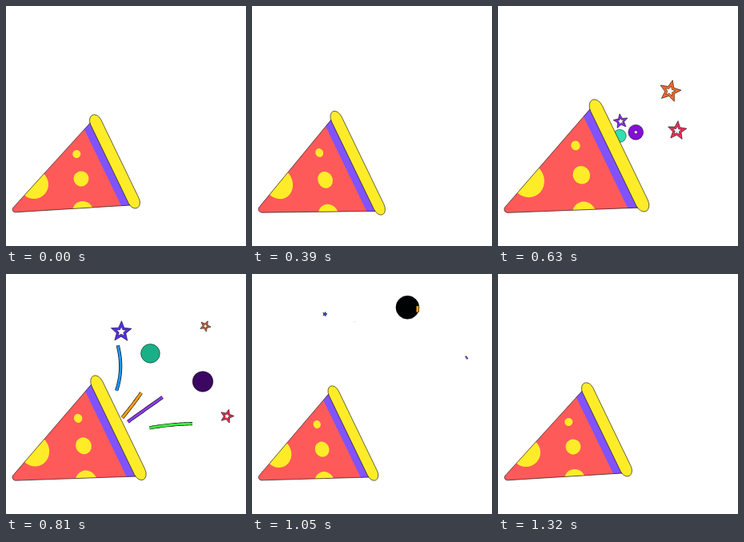
These frames come from a looping animation (300 px wide and 300 px high, 1.38 s). An HTML page with a canvas:

```html
<!DOCTYPE html>
<html lang="en">
<head>
<meta charset="utf-8">
<title>Party popper</title>
<style>
  html, body { margin: 0; width: 100%; height: 100%; overflow: hidden; background: #fff; }
  canvas { display: block; width: 300px; height: 300px; }
</style>
</head>
<body>
<canvas id="stage" width="300" height="300"></canvas>
<script>
const ctx = document.getElementById('stage').getContext('2d');
const LOOP = 1380, STEP = 30, LAST = 1320, BURST = 570;
const RED = '#ff5a5a', YELLOW = '#ffec29', VIOLET = '#8053ff';

const mix = (a, b, p) => a + (b - a) * p;
const progress = (t, from, to) => Math.min(1, Math.max(0, (t - from) / (to - from)));
const easeInOut = p => (1 - Math.cos(Math.PI * p)) / 2;
const easeOut = (p, power) => 1 - (1 - p) ** power;

function paint(color, line = 0.6) {
  ctx.fillStyle = color;
  ctx.fill();
  if (!line) return;
  ctx.lineWidth = line;
  ctx.strokeStyle = '#000';
  ctx.stroke();
}

function circle(x, y, r) {
  ctx.beginPath();
  ctx.arc(x, y, r, 0, 2 * Math.PI);
}

// The cone squashes, swells for the burst, then settles.
const poses = [
  { at: 0, along: 1, across: 1 },
  { at: 210, along: 0.81, across: 1.015 },
  { at: BURST, along: 1.13, across: 1.205 },
  { at: 1080, along: 0.922, across: 1.01 },
  { at: LAST, along: 1, across: 1 }
];
const spots = [
  { u: 101, v: -29, r: 5 }, { u: 92.6, v: 1.4, r: 9.5 },
  { u: 76.5, v: 39.2, r: 13 }, { u: 36.4, v: -17.9, r: 18 }
];

function bodyPath() {
  ctx.beginPath();
  ctx.moveTo(134, -57);
  ctx.lineTo(2, -3.8);
  ctx.bezierCurveTo(-3, -2.5, -3, 2.5, 2, 4);
  ctx.lineTo(134, 58);
  ctx.closePath();
}

function drawCone(t) {
  const next = poses.findIndex(pose => pose.at >= t && pose.at > 0);
  const a = poses[next - 1], b = poses[next];
  const p = easeInOut(progress(t, a.at, b.at));
  const place = () => {
    ctx.translate(10, 255);
    ctx.rotate(-0.45);
    ctx.scale(mix(a.along, b.along, p), mix(a.across, b.across, p));
  };

  ctx.save();
  place();
  bodyPath();
  ctx.save();
  ctx.clip();
  ctx.fillStyle = RED;
  ctx.fillRect(-10, -80, 150, 160);
  ctx.fillStyle = VIOLET;
  ctx.fillRect(123, -80, 14, 160);
  for (const { u, v, r } of spots) {
    circle(u, v, r);
    paint(YELLOW, 0);
  }
  ctx.restore();
  bodyPath();
  ctx.resetTransform();
  paint('transparent');
  place();
  ctx.beginPath();
  ctx.roundRect(132.6, -64.3, 14.4, 129, { x: 7.2, y: 10 });
  ctx.resetTransform();
  paint(YELLOW);
  ctx.restore();
}

// Thrown particles: drag slows the throw (vx, vy) while wind and gravity build up.
function flight({ x, y, vx, vy, wind = 0, gravity = 0, drag }, p) {
  const e = easeOut(p, drag);
  return [x + vx * e + wind * p * p, y + vy * e + gravity * p * p];
}

const stars = [
  { start: 540, end: 930, x: 150, y: 185, vx: 100, vy: -121, drag: 4, size: 14, hue: 18, shift: 0, tilt: 0.12 },
  { start: 540, end: 1020, x: 150, y: 185, vx: 131, vy: -62, gravity: 166, drag: 4, size: 12.5, hue: 346, shift: 8, tilt: 0 },
  { start: 570, end: 1100, x: 150, y: 185, vx: 15, vy: -135, wind: -90, drag: 3, size: 14, hue: 275, shift: -50, tilt: -0.2 }
];

function starPath(x, y, r, turn) {
  ctx.beginPath();
  for (let i = 0; i < 10; i++) {
    const a = turn - Math.PI / 2 + i * Math.PI / 5, d = i % 2 ? r * 0.45 : r;
    ctx.lineTo(x + d * Math.cos(a), y + d * Math.sin(a));
  }
  ctx.closePath();
}

function drawStar(star, t) {
  const p = progress(t, star.start, star.end);
  if (p === 1) return;
  const [x, y] = flight(star, p);
  const r = star.size * Math.sin(Math.PI * p ** (2 / star.drag));
  const turn = star.tilt + p * 0.5;
  starPath(x, y, r, turn);
  paint(`hsl(${star.hue + star.shift * p}, 95%, 58%)`);
  if (r < 4) return;
  starPath(x, y, r * 0.48, turn);
  paint('#fff', 0.5);
}

const discs = [
  { start: BURST, end: 1080, x: 140, y: 186, vx: 78, vy: -147, wind: -25, drag: 1.4, hue: 164, sat: 75, fade: 1.8 },
  { start: BURST, end: 1020, x: 140, y: 168, vx: 142, vy: -45, drag: 1.8, hue: 275, sat: 88, fade: 0.9, hole: 4 }
];

function drawDisc(disc, t) {
  const p = progress(t, disc.start, disc.end);
  if (p === 1) return;
  const [x, y] = flight(disc, p);
  const light = Math.max(0, 55 * (1 - 1.1 * p ** disc.fade));
  circle(x, y, 14.7 * p ** (0.4 / disc.drag));
  paint(`hsl(${disc.hue}, ${disc.sat}%, ${light}%)`, 0.5);
  const hole = (disc.hole || 0) - 15 * p;
  if (hole <= 0) return;
  circle(x, y, hole);
  paint('#fff', 0.5);
}

// Streamers draw on along a quadratic curve, then their tail catches up.
const streamers = [
  { color: '#1e96ff', from: [138, 146], bend: [152, 105], to: [128, 60], pace: 0.58, end: 1055 },
  { color: '#ffa014', from: [145, 180], bend: [207, 107], to: [207, 40], pace: 2.2, end: 1095 },
  { color: '#8c3cf0', from: [152, 185], bend: [209, 144], to: [269, 104], pace: 1.4, end: 1070 },
  { color: '#3cf03c', from: [179, 192.5], bend: [228, 183], to: [297, 190], pace: 1, end: 1020 }
];

function drawStreamer({ color, from, bend, to, pace, end }, t) {
  const head = progress(t, 660, 960) ** pace;
  const tail = easeInOut(progress(t, 800, end));
  if (head <= tail) return;
  const point = p => [0, 1].map(k => mix(mix(from[k], bend[k], p), mix(bend[k], to[k], p), p));
  ctx.beginPath();
  for (let i = 0; i <= 24; i++) ctx.lineTo(...point(mix(tail, head, i / 24)));
  ctx.lineWidth = 4.2;
  ctx.strokeStyle = '#000';
  ctx.stroke();
  ctx.lineWidth = 3;
  ctx.strokeStyle = color;
  ctx.stroke();
}

function draw(t) {
  ctx.fillStyle = '#fff';
  ctx.fillRect(0, 0, 300, 300);
  if (t >= BURST) {
    discs.forEach(disc => drawDisc(disc, t));
    stars.forEach(star => drawStar(star, t));
    streamers.forEach(streamer => drawStreamer(streamer, t));
  }
  drawCone(t);
}

const begin = performance.now();
function frame() {
  const t = (performance.now() - begin) % LOOP;
  draw(Math.min(LAST, Math.floor(t / STEP) * STEP));
  requestAnimationFrame(frame);
}
frame();
</script>
</body>
</html>
```
